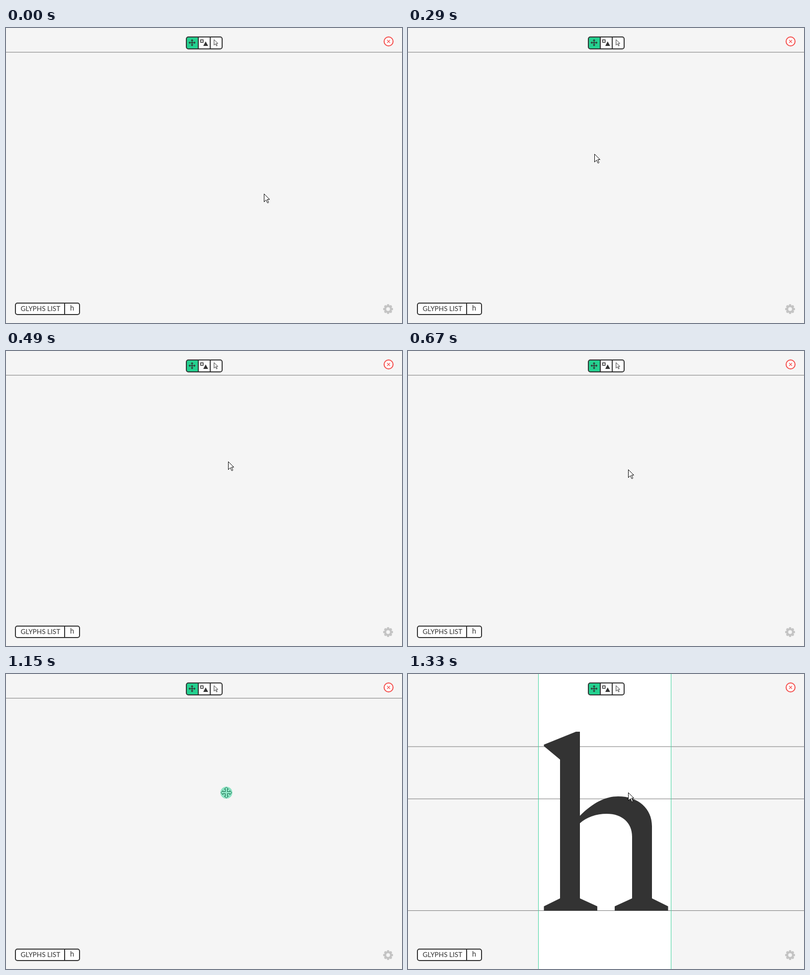
Recreate the animation shown at these times as an HTML page with a canvas. Size 797x593 px, loop 2400 ms.

```html
<!DOCTYPE html>
<html lang="en">
<head>
<meta charset="utf-8">
<title>Glyph editor</title>
<style>
html, body { margin: 0; width: 100%; height: 100%; overflow: hidden; background: #f5f5f5; }
canvas { display: block; }
</style>
</head>
<body>
<canvas id="stage" width="797" height="593"></canvas>
<script>
const WIDTH = 797, HEIGHT = 593, LOOP = 2400;
const INK = '#333', GREEN = '#24d08f', RED = '#f4504e', PAPER = '#f5f5f5';
const MOVE = 200, REST = 670, PRESS = 1080, RELEASE = 1300, OPEN = 1330;
const ctx = document.getElementById('stage').getContext('2d');

// Bends of the pointer's hooked path, joined by a smooth curve
const BENDS = [
  { t: 150, x: 519, y: 333 },
  { t: 290, x: 375, y: 253 },
  { t: 390, x: 357, y: 205 },
  { t: 490, x: 447, y: 222 },
  { t: REST, x: 443, y: 238 }
];

const ARROW = new Path2D('M.5 .5V16.5L4.5 12.5L7.2 18.5H8.8L9.5 17.5L7 11.5H11.5Z');

// Vertical stem with a slab foot, starting and ending at its top corners
const stem = (x, top, rightTop) =>
  `M${x} ${top}V451l-32.5 16v9h107.5v-9l-35 -16V${rightTop}`;
const GLYPH = new Path2D(
  stem(306, 172, 116) + 'H338L273.5 142V145Z' +
  'M346 285C372 259 397 246 423 246C463 246 491 270 491 306V451' +
  'l32.5 16v9H416v-9L451 451V327C451 299 431 281 400 281C379 281 359 288 346 300Z');

function rect(color, x, y, w, h) {
  ctx.fillStyle = color;
  ctx.fillRect(x, y, w, h);
}

function stroke(path, color, width) {
  ctx.strokeStyle = color;
  ctx.lineWidth = width;
  ctx.stroke(path);
}

function fill(path, color, rule = 'nonzero') {
  ctx.fillStyle = color;
  ctx.fill(path, rule);
}

function disc(x, y, r) {
  const path = new Path2D();
  path.arc(x, y, r, 0, Math.PI * 2);
  return path;
}

function frame(x, y, w, h, dividers, activeWidth = 0) {
  const box = new Path2D();
  box.roundRect(x + 1, y + 1, w - 2, h - 2, 4);
  fill(box, '#fff');
  if (activeWidth) {
    ctx.save();
    ctx.clip(box);
    rect(GREEN, x, y, activeWidth, h);
    ctx.restore();
  }
  stroke(box, INK, 2);
  dividers.forEach(d => rect(INK, d, y + 1, 2, h - 2));
}

function text(label, x, y, size) {
  ctx.fillStyle = INK;
  ctx.font = `${size}px Lato, "Noto Sans", sans-serif`;
  ctx.fillText(label, x, y);
}

// Four-headed arrow: half shaft width, half head width, head start, tip
function fourWay(x, y, shaft, head, neck, tip) {
  const arm = [[-shaft, -shaft], [-shaft, -neck], [-head, -neck],
    [0, -tip], [head, -neck], [shaft, -neck]];
  const path = new Path2D();
  for (let i = 0; i < 4; i++) {
    const c = Math.cos(i * Math.PI / 2), s = Math.sin(i * Math.PI / 2);
    arm.forEach(([px, py]) => path.lineTo(x + px * c - py * s, y + px * s + py * c));
  }
  path.closePath();
  return path;
}

function drawArrow(x, y, scale, line) {
  ctx.save();
  ctx.translate(x, y);
  ctx.scale(scale, scale);
  fill(ARROW, '#fff');
  stroke(ARROW, line, 1 / scale);
  ctx.restore();
}

function drawToolbar() {
  frame(362, 17, 74, 26, [386, 410], 25);
  fill(fourWay(374.5, 29.5, .8, 2.8, 4, 7), INK);
  stroke(new Path2D('M391.75 23.75h5v5h-5Z'), INK, 1.5);
  fill(new Path2D('M397 36L401.9 27L406.8 36Z'), INK);
  drawArrow(418.4, 23, .7, INK);
}

function drawClose() {
  const button = disc(770, 27, 9);
  fill(button, '#fff');
  stroke(button, RED, 2);
  stroke(new Path2D('M767 24l6 6m0 -6l-6 6'), RED, 1.2);
}

function drawGear() {
  const gear = new Path2D(), teeth = 8, pitch = Math.PI * 2 / teeth;
  const corner = (r, a) => gear.lineTo(769 + r * Math.cos(a), 565 + r * Math.sin(a));
  for (let i = 0; i < teeth; i++) {
    const a = i * pitch;
    corner(7.8, a - .32);
    corner(10, a - .2);
    corner(10, a + .2);
    corner(7.8, a + .32);
  }
  gear.closePath();
  gear.addPath(disc(769, 565, 3.8));
  fill(gear, '#c4c4c4', 'evenodd');
}

function drawGlyphList() {
  frame(18, 552, 131, 25, [117]);
  text('GLYPHS LIST', 29.5, 569, 13.6);
  text('h', 129, 568, 14.5);
}

function drawGlyph() {
  rect('#fff', 263, 0, 266, HEIGHT);
  [146, 251, 475.6].forEach(y => rect('#777', 0, y - .5, WIDTH, 1));
  [262, 529].forEach(x => rect('#43d39f', x, 0, 1, HEIGHT));
  fill(GLYPH, INK);
}

function spline(a, b, c, d, u) {
  return b + u / 2 * (c - a + u * (2 * a - 5 * b + 4 * c - d + u * (3 * (b - c) + d - a)));
}

function pointerAt(t) {
  if (t < MOVE) return BENDS[0];
  if (t >= REST) return BENDS.at(-1);
  // The pointer is sampled every 50 ms
  const sample = Math.floor((t + 10) / 50) * 50 - 10;
  const i = BENDS.findLastIndex(bend => bend.t <= sample);
  const bend = k => BENDS[Math.max(0, Math.min(BENDS.length - 1, i + k))];
  const u = (sample - bend(0).t) / (bend(1).t - bend(0).t);
  const along = axis => Math.round(
    spline(bend(-1)[axis], bend(0)[axis], bend(1)[axis], bend(2)[axis], u));
  return { x: along('x'), y: along('y') };
}

function drawPress() {
  const cross = fourWay(443.5, 238.5, 2, 4, 7, 11);
  fill(cross, '#fff');
  stroke(cross, '#000', 1);
  ctx.globalAlpha = .5;
  fill(disc(443.5, 238.5, 12), GREEN);
  ctx.globalAlpha = 1;
}

function draw(t) {
  rect(PAPER, 0, 0, WIDTH, HEIGHT);
  if (t >= OPEN) drawGlyph();
  else rect('#777', 0, 48.2, WIDTH, 1);
  drawToolbar();
  drawClose();
  drawGear();
  drawGlyphList();
  if (t >= PRESS && t < RELEASE) {
    drawPress();
  } else {
    const { x, y } = pointerAt(t);
    drawArrow(x, y, 1, '#000');
  }
}

const start = performance.now();
function tick() {
  draw((performance.now() - start) % LOOP);
  requestAnimationFrame(tick);
}
tick();
</script>
</body>
</html>
```
